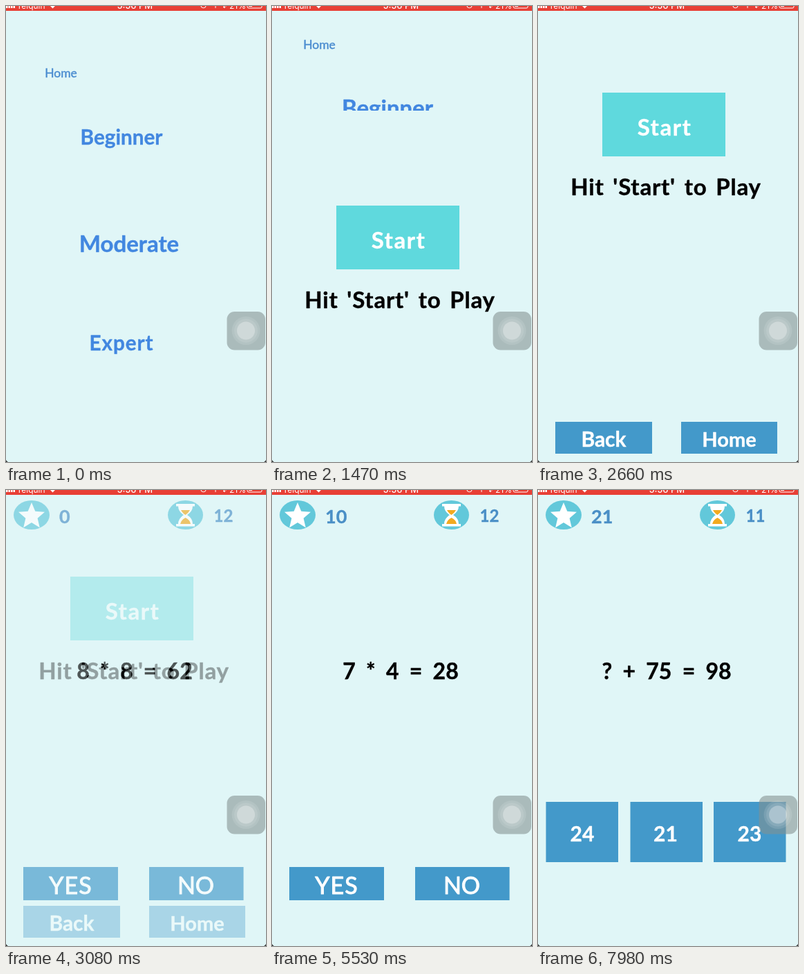
Animation, 376 px wide and 658 px high, one loop 8000 ms. Source, as an HTML page:

```html
<!DOCTYPE html>
<html lang="en">
<head>
<meta charset="utf-8">
<title>Maths quiz</title>
<style>
html, body { margin: 0; height: 100%; overflow: hidden; background: #e0f6f7; }
svg { display: block; width: 100%; height: 100%; }
text {
  font: 700 33px Lato, sans-serif;
  fill: currentColor; stroke: currentColor;
  stroke-width: .4px; stroke-linejoin: round;
  text-anchor: middle;
}
.menu { color: #4287e0; }
.status text { font: 400 13px Inter, sans-serif; stroke: none; }
</style>
</head>
<body>
<svg id="stage" viewBox="0 0 376 658"></svg>
<script>
const LOOP = 8000;
const stage = document.getElementById('stage');

const label = (s, x, y, size = 33, color = '', style = '', id = '') =>
  `<text${id && ` id="${id}"`} x="${x}" y="${y}" style="font-size:${size}px;${color && `color:${color};`}${style}">${s}</text>`;
const box = (x, y, w, h, fill) => `<rect x="${x}" y="${y}" width="${w}" height="${h}" fill="${fill}"/>`;
const page = (id, body) => `<g id="${id}">${box(0, -12, 376, 682, '#e0f6f7')}${body}</g>`;
const blue = '#4399ca';

const star = Array.from({ length: 10 }, (_, i) => {
  const r = i % 2 ? 9 : 20, a = i * Math.PI / 5;
  return [37 + r * Math.sin(a), 38 - r * Math.cos(a)].map(v => v.toFixed(1));
}).join(' ');

const hud = (id, score) => `
  <ellipse cx="37" cy="36" rx="26" ry="21" fill="#62c8da"/>
  <polygon points="${star}" fill="#fff"/>
  ${label(score, 77, 48, 27, '#4a8fc6', 'text-anchor:start')}
  <ellipse cx="259.5" cy="36" rx="25.5" ry="21" fill="#62c8da"/>
  <path d="M246 20h27v3.500h-27zM246 49h27v3.500h-27zM249 23h21q0 8-8 13q8 5 8 13h-21q0-8 8-13q-8-5-8-13z" fill="#fff"/>
  <path d="M253 29h13q-2 4-6.500 7q-4.500-3-6.500-7zM252 49q1-6 7.500-9q6.500 3 7.500 9z" fill="#f2aa20"/>
  ${label('12', 314.500, 46, 24, '#4a8fc6', '', id + 'Time')}`;

const sum = s => label(s, 186, 273, 32, '#000', 'word-spacing:7.5px');

const yesNo = id => {
  const style = 'font-weight:400;stroke-width:1px';
  return box(25, 544, 137, 48, blue) + box(207, 544, 136.500, 48, blue) +
    label('YES', 93.500, 583, 34, '#fff', style + ';letter-spacing:1px', id + 'Yes') +
    label('NO', 274.500, 583, 34, '#fff', style, id + 'No');
};

const answers = [[11.500, 64, 24], [133.500, 184.500, 21], [254, 306, 23]].map(([x, mid, n]) =>
  box(x, 450, 104.500, 87, blue) + label(n, mid, 507, 30, '#fff')).join('');

stage.innerHTML =
  page('menu', `<g class="menu">
    ${label('Home', 0, 0, 17.500, '#4a8cd0', 'font-weight:400', 'home')}
    ${label('Beginner', 0, 0, 33, '', '', 'beginner')}
    ${label('Moderate', 0, 0, 33, '', '', 'moderate')}
    ${label('Expert', 0, 0, 33, '', 'letter-spacing:1px', 'expert')}</g>`) +
  page('ready',
    box(93, 125, 178, 92, '#5fd9dd') +
    label('Start', 183, 187, 33, '#fff', 'letter-spacing:1.5px', 'start') +
    label("Hit 'Start' to Play", 185, 273, 33, '#000', 'letter-spacing:.8px;word-spacing:4px') +
    box(25, 600, 140, 46, blue) + box(207, 600, 139, 46, blue) +
    label('Back', 95, 636, 30, '#fff') + label('Home', 276.500, 636, 29, '#fff')) +
  page('first', hud('first', 0) + sum('8 * 8 = 62') + yesNo('first')) +
  page('second', hud('second', 10) + sum('7 * 4 = 28') + yesNo('second')) +
  page('third', hud('third', 21) + sum('? + 75 = 98') + answers) +
  `<g class="status">
    ${box(0, 0, 376, 7, '#e83f35')}
    ${[0, 3.500, 7, 10.500].map(x => box(x, 0, 2.500, 3, '#fff')).join('')}
    ${label('Telquin', 36, 3.500, 12, '#fff')}
    <path d="M64 0h7l-3.500 3.500z" fill="#fff"/>
    ${label('5:56 PM', 186.500, 3.500, 13, '#fff', 'font-weight:500')}
    <circle cx="285.500" cy="-1" r="3.800" fill="none" stroke="#fff"/>
    <path d="M303 0v3M314 2l3-3M315.500-2v5l2.500-2.500" fill="none" stroke="#fff"/>
    ${label('21%', 335, 3.500, 12, '#fff')}
    <rect x="349" y="-7" width="21" height="10" rx="2" fill="none" stroke="#fff"/>
    ${box(351, -5, 5, 6, '#fff')}
  </g>
  <path d="M0 655v3h3q-2-1-3-3M376 655v3h-3q2-1 3-3" fill="#333"/>
  <rect x="319.500" y="441" width="55.500" height="55.500" rx="11" fill="rgb(131,146,145)" fill-opacity=".58"/>
  <g fill="#fff">
    <circle cx="347" cy="468.500" r="20.500" opacity=".11"/>
    <circle cx="347" cy="468.500" r="17" opacity=".1"/>
    <circle cx="347" cy="468.500" r="13" opacity=".3"/>
  </g>`;

const $ = id => document.getElementById(id);
const ramp = (t, a, b) => Math.min(1, Math.max(0, (t - a) / (b - a)));
const smooth = p => p * p * (3 - 2 * p);
const fade = (id, v) => $(id).setAttribute('opacity', v);
const press = (id, t, a, b) => fade(id, 1 - .84 * (ramp(t, a, a + 60) - ramp(t, b, b + 150)));

// id, settled x and y, x shift and scale at the start
const menu = [
  ['home', 68.500, 61.500, 11, 1],
  ['beginner', 167, 158.500, 0, .9],
  ['moderate', 167, 314, 11, 1],
  ['expert', 167, 456, 0, .9]
];

function draw(t) {
  const left = (1 - ramp(t, 70, 630)) ** 3;
  for (const [id, x, y, dx, scale] of menu)
    $(id).setAttribute('transform',
      `translate(${x + dx * left} ${y + 41 * left}) scale(${1 - (1 - scale) * left})`);

  // critically damped slide from below
  const k = Math.max(0, t - 1321.500) * .01826;
  $('ready').setAttribute('transform', `translate(0 ${670 * (1 + k) * Math.exp(-k)})`);

  fade('first', smooth(ramp(t, 2870, 3220)));
  fade('second', smooth(ramp(t, 4950, 5350)));
  fade('third', smooth(ramp(t, 6930, 7300)));

  press('beginner', t, 1050, 1200);
  press('start', t, 2700, 2880);
  press('firstNo', t, 4780, 4960);
  press('secondYes', t, 6760, 6960);

  $('firstTime').textContent = t < 3850 ? 12 : t < 4830 ? 11 : 10;
  $('secondTime').textContent = t < 6100 ? 12 : 11;
  $('thirdTime').textContent = t < 7910 ? 12 : 11;
}

const begin = performance.now();
function tick() {
  draw((performance.now() - begin) % LOOP);
  requestAnimationFrame(tick);
}
tick();
</script>
</body>
</html>
```
